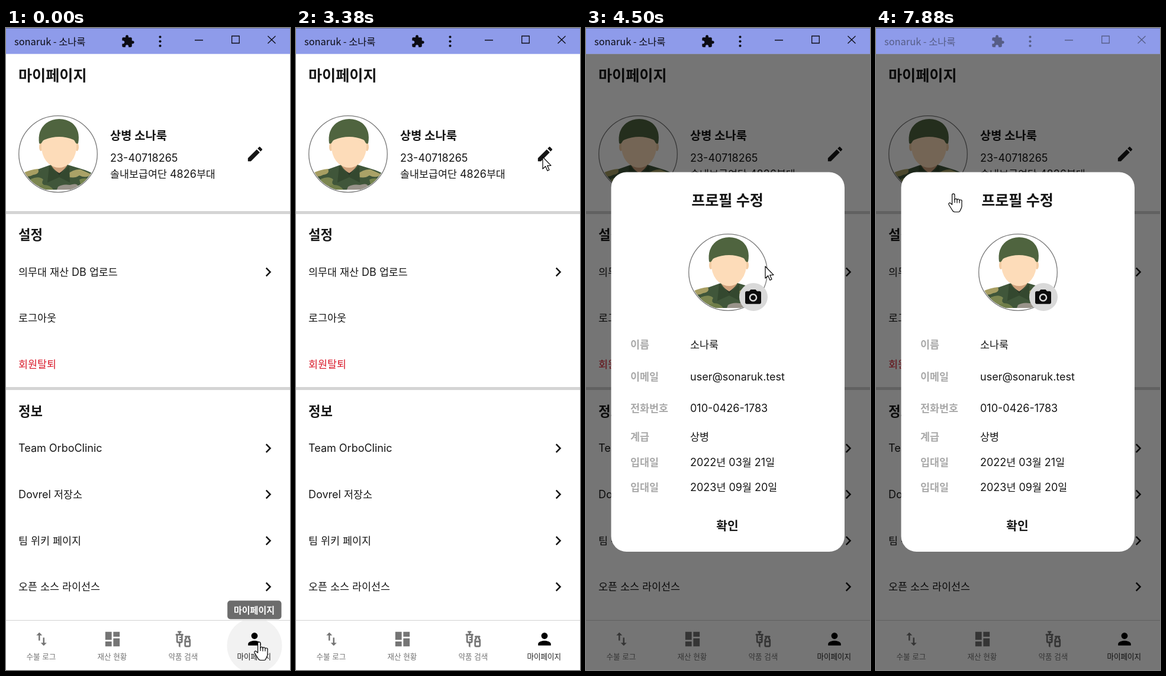
Write an HTML page with a canvas that moves like this. It is 480x1080 px and loops after 8000 ms.

```html
<!DOCTYPE html>
<html lang="ko">
<head>
<meta charset="utf-8">
<title>마이페이지</title>
<style>
html, body { margin: 0; width: 100%; height: 100%; overflow: hidden; background: #fff; }
canvas { display: block; width: 480px; height: 1080px; }
</style>
</head>
<body>
<canvas id="stage" width="480" height="1080"></canvas>
<script>
const ctx = document.getElementById('stage').getContext('2d');
const LOOP = 8000, TICK = 125;
const INK = '#161616', GREY = '#757575';

// 24-unit icon outlines
const ICON = {
  edit: 'M3 17.25V21h3.75L17.81 9.94l-3.75-3.75L3 17.25zM20.71 7.04c.39-.39.39-1.02 0-1.41l-2.34-2.34c-.39-.39-1.02-.39-1.41 0l-1.83 1.83 3.75 3.75 1.83-1.83z',
  next: 'M10 6L8.59 7.41 13.17 12l-4.58 4.59L10 18l6-6z',
  swap: 'M16 17.01V10h-2v7.01h-3L15 21l4-3.99h-3zM9 3L5 6.99h3V14h2V6.99h3L9 3z',
  board: 'M3 13h8V3H3v10zm0 8h8v-6H3v6zm10 0h8V11h-8v10zm0-18v6h8V3h-8z',
  vaccine: 'M11 5.5H8V4h.5c.55 0 1-.45 1-1s-.45-1-1-1h-3c-.55 0-1 .45-1 1s.45 1 1 1H6v1.5H3c-.55 0-1 .45-1 1s.45 1 1 1V15c0 1.1.9 2 2 2h1v4l2 1.5V17h1c1.1 0 2-.9 2-2V7.5c.55 0 1-.45 1-1s-.45-1-1-1zM9 9H7.25c-.41 0-.75.34-.75.75s.34.75.75.75H9V12H7.25c-.41 0-.75.34-.75.75s.34.75.75.75H9V15H5V7.5h4zM19.5 10.5V10c.55 0 1-.45 1-1s-.45-1-1-1h-5c-.55 0-1 .45-1 1s.45 1 1 1v.5c0 .5-1.5 1.16-1.5 3V20c0 1.1.9 2 2 2h4c1.1 0 2-.9 2-2v-6.5c0-1.84-1.5-2.5-1.5-3zM15 14c0-1.3 1.5-1.6 1.5-3.5V10h1v.5c0 1.9 1.5 2.2 1.5 3.5zM15 20v-4h4v4z',
  person: 'M12 12c2.21 0 4-1.79 4-4s-1.79-4-4-4-4 1.79-4 4 1.79 4 4 4zm0 2c-2.67 0-8 1.34-8 4v2h16v-2c0-2.66-5.33-4-8-4z',
  puzzle: 'M20.5 11H19V7c0-1.1-.9-2-2-2h-4V3.5C13 2.12 11.88 1 10.5 1S8 2.12 8 3.5V5H4c-1.1 0-1.99.9-1.99 2v3.8H3.5c1.49 0 2.7 1.21 2.7 2.7s-1.21 2.7-2.7 2.7H2V20c0 1.1.9 2 2 2h3.8v-1.5c0-1.49 1.21-2.7 2.7-2.7 1.49 0 2.7 1.21 2.7 2.7V22H17c1.1 0 2-.9 2-2v-4h1.5c1.38 0 2.5-1.12 2.5-2.5S21.88 11 20.5 11z',
  camera: 'M9 2L7.17 4H4c-1.1 0-2 .9-2 2v12c0 1.1.9 2 2 2h16c1.1 0 2-.9 2-2V6c0-1.1-.9-2-2-2h-3.17L15 2H9zm3 15c-2.76 0-5-2.24-5-5s2.24-5 5-5 5 2.24 5 5-2.24 5-5 5zM15.2 12a3.2 3.2 0 1 0-6.4 0 3.2 3.2 0 1 0 6.4 0z'
};
const HAND = new Path2D('M6.6 19V3a2.2 2.2 0 0 1 4.4 0V11a2 2 0 0 1 4 .6a2 2 0 0 1 4 .8a2 2 0 0 1 4 1.6V22c0 3-2 5-3 7.5c-.5 1.5-1 2-2.5 2H11c-2 0-3-1-4-3L1 19c-1-2 1.5-3.8 3.2-2z');
const KNUCKLES = new Path2D('M11 10v6M15 11.5v5M19 12.5v4');
const ARROW = new Path2D('M0 0V20L4.7 15.7 8 23.2 11 21.8 7.8 14.6 14 14.3z');
for (const k in ICON) ICON[k] = new Path2D(ICON[k]);

function at(x, y, scale, draw) {
  ctx.save();
  ctx.translate(x, y);
  ctx.scale(scale, scale);
  draw();
  ctx.restore();
}

function icon(name, x, y, scale, color) {
  at(x, y, scale, () => {
    ctx.translate(-12, -12);
    ctx.fillStyle = color;
    ctx.fill(ICON[name], 'evenodd');
  });
}

// Hangul and Latin runs use separate faces; y is the visual middle
function text(str, x, y, size, { weight = 400, color = INK, center = false } = {}) {
  const runs = str.match(/[가-힣]+|[^가-힣]+/g).map(s => {
    const font = /[가-힣]/.test(s)
      ? `${weight} ${size * 0.966}px "Noto Sans CJK KR", "Noto Sans CJK", sans-serif`
      : `${weight} ${size}px Inter, sans-serif`;
    ctx.font = font;
    return { s, font, w: ctx.measureText(s).width };
  });
  if (center) x -= runs.reduce((sum, r) => sum + r.w, 0) / 2;
  ctx.fillStyle = color;
  for (const r of runs) {
    ctx.font = r.font;
    ctx.fillText(r.s, x, y + size * 0.355);
    x += r.w;
  }
}

function rect(x, y, w, h, color, radius = 0) {
  ctx.fillStyle = color;
  ctx.beginPath();
  ctx.roundRect(x, y, w, h, radius);
  ctx.fill();
}

function oval(x, y, rx, ry, color) {
  ctx.fillStyle = color;
  ctx.beginPath();
  ctx.ellipse(x, y, rx, ry, 0, 0, 7);
  ctx.fill();
}

function shape(d, color) {
  ctx.fillStyle = color;
  ctx.fill(new Path2D(d));
}

function soldier() {
  ctx.beginPath();
  ctx.ellipse(0, 0, 65, 63, 0, 0, 7);
  ctx.clip();
  ctx.beginPath();
  ctx.rect(-66, -66, 132, 126);
  ctx.clip();
  shape('M-66 37Q-52 29-32 25L-12 18H16L36 24Q54 29 66 37V62H-66z', '#40563a');
  shape('M-60 32Q-46 26-34 25Q-30 33-42 35Q-50 40-60 36z', '#a79e62');
  shape('M-46 42Q-32 36-25 43Q-30 50-22 53Q-36 56-46 50z', '#7c8650');
  shape('M-62 46Q-48 50-40 60H-62z', '#2c3b29');
  shape('M16 34Q26 25 38 26L56 34Q48 42 36 36Q28 42 16 38z', '#aaa267');
  shape('M36 43Q46 38 64 46V54Q48 50 38 51z', '#75834c');
  shape('M0 55Q8 50 20 52Q32 48 34 54L44 60H-2z', '#99938a');
  shape('M-30 53Q-16 49-8 60H-34z', '#6f7d49');
  shape('M-15 19L2 36 19 19 20 48 2 39-18 48z', '#34482f');
  shape('M-12 19L2 36 16 19z', '#2a3827');
  shape('M-11 8H15V20Q9 28 2 32Q-6 28-11 20z', '#d0a27c');
  oval(-29, -12, 3, 7, '#f3cda5');
  oval(32, -12, 3, 7, '#f3cda5');
  shape('M-28-30H31V-9Q29 8 18 17Q10 23 2 23Q-7 23-15 17Q-26 8-28-9z', '#fddcb9');
  shape('M-32-18Q-35-40-20-52Q-10-59 2-59Q14-59 24-52Q38-40 34-18Q31-16 29-20Q28-23 26-24Q2-34-23-24Q-26-23-27-20Q-29-16-32-18z', '#4f643f');
}

function avatar(x, y, loaded) {
  oval(x, y, 66, 64, '#fff');
  if (loaded) {
    at(x, y, 1, soldier);
  } else {
    ctx.strokeStyle = '#e0e0e0';
    ctx.lineWidth = 5;
    ctx.beginPath();
    ctx.arc(x, y, 25, -0.85, 0.85);
    ctx.stroke();
  }
  ctx.strokeStyle = '#777';
  ctx.lineWidth = 1.3;
  ctx.beginPath();
  ctx.ellipse(x, y, 66.3, 64.3, 0, 0, 7);
  ctx.stroke();
}

function titleBar(active) {
  const ink = active ? '#0c0c14' : '#565d86';
  rect(0, 0, 480, 43.5, '#8e9bea');
  rect(0, 0, 480, 1, '#6a74ad');
  ctx.fillStyle = ink;
  ctx.font = '300 16.4px "Noto Sans CJK KR", "Noto Sans CJK", sans-serif';
  ctx.fillText('sonaruk - 소나룩', 14, 29);
  icon('puzzle', 206, 22.5, 0.97, ink);
  for (const y of [15, 22.5, 30]) oval(260.5, y, 2.1, 2.1, ink);
  ctx.strokeStyle = ink;
  ctx.lineWidth = 1.3;
  ctx.stroke(new Path2D('M319 20.5H333M381.7 13.5H394.3V25.5H381.7zM442.5 13.5L455.5 26M455.5 13.5L442.5 26'));
}

function page(hover) {
  const bold = { weight: 700 };
  rect(0, 43.5, 480, 1036.5, '#fff');
  text('마이페이지', 21, 80, 26, bold);
  avatar(88, 212, true);
  text('상병 소나룩', 176, 181, 20.5, bold);
  text('23-40718265', 176, 219, 18);
  text('솔내보급여단 4826부대', 176, 246, 18);
  icon('edit', 421, 212, 1.35, INK);
  rect(0, 308, 480, 5, '#d4d4d4');
  text('설정', 21, 348, 23, bold);
  text('의무대 재산 DB 업로드', 21, 411, 18);
  text('로그아웃', 21, 488, 18);
  text('회원탈퇴', 21, 566, 18, { color: '#d91c2c' });
  rect(0, 604, 480, 5, '#d4d4d4');
  text('정보', 21, 645, 23, bold);
  text('Team OrboClinic', 21, 707, 18);
  text('Dovrel 저장소', 21, 785, 18);
  text('팀 위키 페이지', 21, 863, 18);
  text('오픈 소스 라이선스', 21, 940, 18);
  for (const y of [410.5, 707, 784.5, 862.5, 940]) icon('next', 443.2, y, 1.28, INK);
  rect(0, 996, 480, 1, '#d2d2d2');
  if (hover > 0) {
    ctx.save();
    ctx.beginPath();
    ctx.rect(360, 997, 120, 83);
    ctx.clip();
    ctx.globalAlpha = hover;
    oval(420, 1039, 46.5, 46.5, '#f2f2f2');
    ctx.restore();
  }
  const tabs = [['swap', '수불 로그'], ['board', '재산 현황'], ['vaccine', '약품 검색'], ['person', '마이페이지']];
  tabs.forEach(([name, label], i) => {
    const on = i === 3, x = 60 + i * 120;
    icon(name, x, 1028, i ? 1.35 : 1.25, on ? '#000' : GREY);
    text(label, x - 0.7, 1057, 13, { color: on ? '#222' : GREY, center: true });
  });
}

function tooltip(alpha) {
  ctx.save();
  ctx.globalAlpha = alpha;
  rect(374.2, 963.2, 91.3, 31.3, '#6c6c6c', 5);
  text('마이페이지', 419.5, 979, 15.6, { weight: 600, color: '#fff', center: true });
  ctx.restore();
}

function dialog(alpha, loaded) {
  ctx.save();
  ctx.globalAlpha = 0.54 * alpha;
  rect(0, 43.5, 480, 1036.5, '#000');
  ctx.globalAlpha = alpha;
  rect(42.5, 242.5, 394.5, 638.5, '#fff', 26);
  text('프로필 수정', 239, 290, 26, { weight: 700, center: true });
  avatar(240, 411, loaded);
  oval(283, 452.5, 24, 23.5, '#d9d9d9');
  icon('camera', 282.5, 453.5, 1.35, '#0c0c0c');
  const fields = [
    [533, '이름', '소나룩'],
    [587, '이메일', 'user@sonaruk.test'],
    [640, '전화번호', '010-0426-1783'],
    [688, '계급', '상병'],
    [731, '입대일', '2022년 03월 21일'],
    [773, '입대일', '2023년 09월 20일']
  ];
  for (const [y, label, value] of fields) {
    text(label, 75, y, 18, { weight: 700, color: '#a9a9a9' });
    text(value, 176, y, 18);
  }
  text('확인', 239, 838, 21, { weight: 700, center: true });
  ctx.restore();
}

// time, x, y of the pointer tip
const TRACK = [
  [0, 428, 1033], [625, 428, 1033], [1500, 425, 1010], [2000, 422, 646],
  [2375, 421, 520], [3250, 418, 223], [3375, 417, 217], [3625, 417, 217],
  [4500, 303, 401], [5000, 235, 418], [7000, 235, 418], [7875, 131, 279]
];

function pointer(t) {
  const i = Math.max(1, TRACK.findIndex(k => k[0] >= t));
  const [t0, x0, y0] = TRACK[i - 1], [t1, x1, y1] = TRACK[i];
  const p = (t - t0) / (t1 - t0);
  return [x0 + (x1 - x0) * p, y0 + (y1 - y0) * p];
}

function cursor(t) {
  const [x, y] = pointer(t);
  const hand = t < 2875 || t >= 7500;
  at(hand ? x - 9 : x, hand ? y - 1 : y, 1, () => {
    ctx.fillStyle = '#fff';
    ctx.strokeStyle = '#000';
    ctx.lineWidth = 1.2;
    ctx.lineJoin = 'round';
    const body = hand ? HAND : ARROW;
    ctx.fill(body);
    ctx.stroke(body);
    if (hand) ctx.stroke(KNUCKLES);
  });
  if (t >= 6250 && t < 7000) busyRing(x + 19, y + 1, t);
}

function busyRing(x, y, t) {
  const turn = t / 1000 * Math.PI * 2;
  const ring = (r, w, color, a, b) => {
    ctx.strokeStyle = color;
    ctx.lineWidth = w;
    ctx.beginPath();
    ctx.arc(x, y, r, a, b);
    ctx.stroke();
  };
  ring(7.3, 6, '#4f78cf', 0, 7);
  ring(7.3, 3.6, '#7da2ee', 0, 7);
  ring(7.3, 3.6, '#a5c0f7', turn, turn + 1.4);
}

const fade = (t, from, to) => Math.min(1, Math.max(0, (to - t) / (to - from)));

function draw(t) {
  page(fade(t, 1500, 1875));
  const tip = fade(t, 2125, 2375);
  if (tip > 0) tooltip(tip);
  if (t >= 3500) dialog(t < 3625 ? 0.9 : 1, t >= 3625);
  titleBar(t < 6125);
  cursor(t);
}

function loop(now) {
  const t = now % LOOP;
  draw(Math.floor(t / TICK) * TICK);
  requestAnimationFrame(loop);
}
draw(0);
requestAnimationFrame(loop);
</script>
</body>
</html>
```
